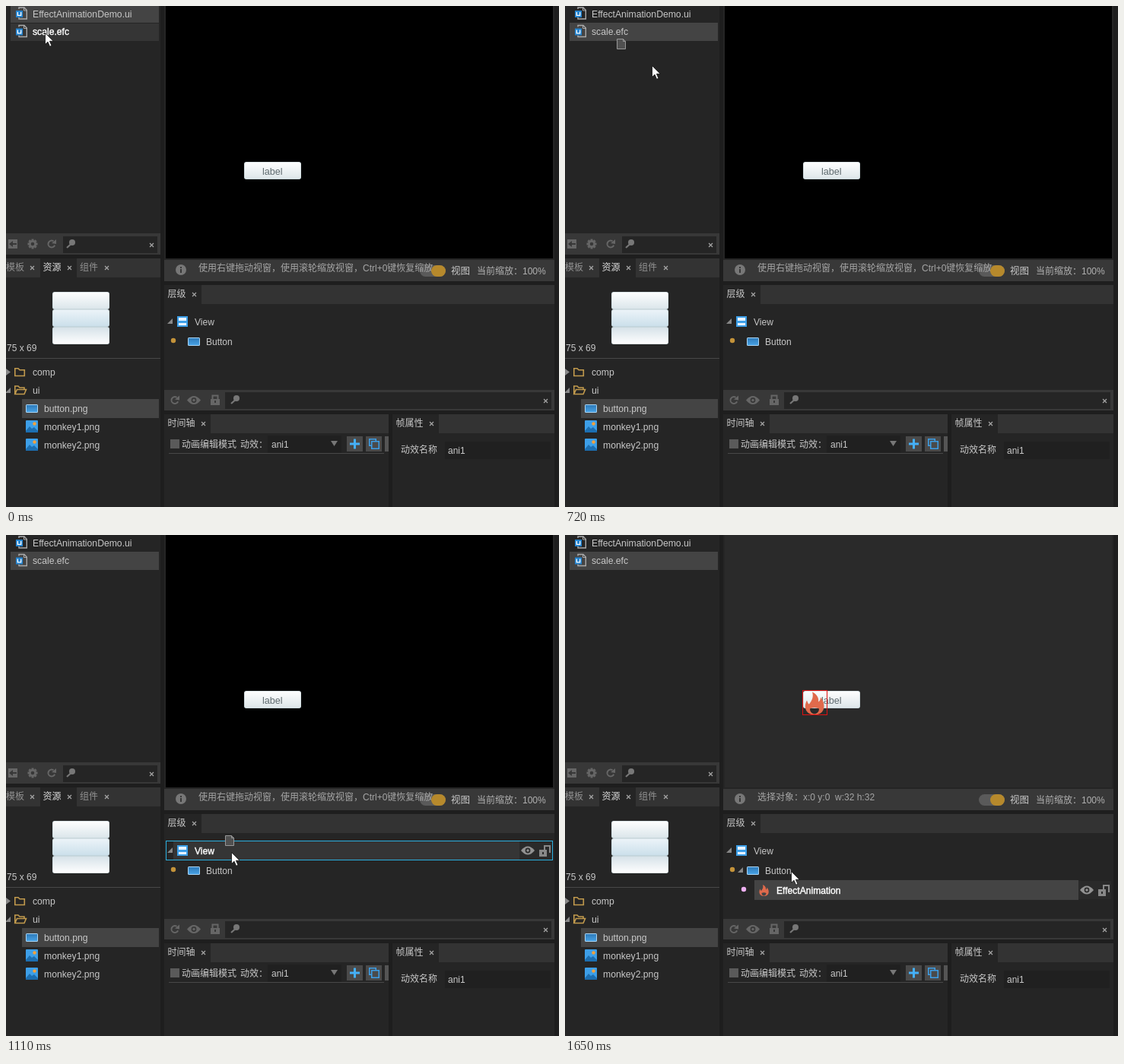
Recreate the animation shown at these times as an HTML page with a canvas. Size 727 px wide and 659 px high, loop 3.3 s.

```html
<!DOCTYPE html>
<html lang="zh-CN">
<head>
<meta charset="utf-8">
<style>
html, body { margin: 0; width: 100%; height: 100%; overflow: hidden; background: #1e1e1e; }
canvas { display: block; }
</style>
</head>
<body>
<canvas id="stage" width="727" height="659"></canvas>
<script>
const ctx = document.getElementById('stage').getContext('2d');
const LOOP = 3300, STEP = 30, DRAG = 660, DROP = 1650;
const FONT = '"Liberation Sans", "Noto Sans CJK SC", "Noto Sans CJK", sans-serif';
const PANEL = '#252525', STRIP = '#333', BAR = '#383838', SELECTED = '#444', FIELD = '#202020';
const TEXT = '#c8c8c8', DIM = '#929292', ICON = '#666', BLUE = '#3d9fe8', GOLD = '#c19a4d';

// Pointer positions, one per step, starting just before the drag
const dragPath = [[51, 33], [54, 36], [75, 51], [114, 78], [160, 110], [207, 151], [243, 194],
  [257, 219], [275, 262], [287, 306], [290, 338], [290, 360], [290, 368], [291, 381], [293, 391],
  [295, 403], [296, 417], [297, 434], [297, 438], [297, 440], [297, 441], [297, 442]];
const flame = new Path2D('M13 2C20 5 22 11 21 15C23 14 24 12 24 9C31 17 31 32 16 32C5 32 1 22 6 13' +
  'C7 16 8 18 9 18C13 13 15 8 13 2ZM10 24C10 33 22 33 22 24C18 22 14 22 10 24Z');
const arrow = new Path2D('M.5 .5V15.5L4 12.2L6.6 18.2L9 17.2L6.4 11.3H11.2Z');
const page = new Path2D('M.5 .5H8.5L11.5 3.5V13.5H.5Z');
const eyeShape = new Path2D('M-9 0Q0 -11 9 0Q0 11 -9 0Z');

function rect(x, y, w, h, color) {
  ctx.fillStyle = color;
  ctx.fillRect(x, y, w, h);
}
function frame(x, y, w, h, color, width = 1) {
  ctx.strokeStyle = color;
  ctx.lineWidth = width;
  ctx.strokeRect(x + width / 2, y + width / 2, w - width, h - width);
}
function round(x, y, w, h, r, color) {
  ctx.fillStyle = color;
  ctx.beginPath();
  ctx.roundRect(x, y, w, h, r);
  ctx.fill();
}
function disc(x, y, r, color) {
  ctx.fillStyle = color;
  ctx.beginPath();
  ctx.arc(x, y, r, 0, 7);
  ctx.fill();
}
function poly(color, ...points) {
  ctx.fillStyle = color;
  ctx.beginPath();
  for (const [x, y] of points) ctx.lineTo(x, y);
  ctx.fill();
}
function line(color, width, ...points) {
  ctx.strokeStyle = color;
  ctx.lineWidth = width;
  ctx.beginPath();
  for (const [x, y] of points) ctx.lineTo(x, y);
  ctx.stroke();
}
function text(s, x, y, color = TEXT, size = 12) {
  ctx.font = `${size}px ${FONT}`;
  ctx.fillStyle = color;
  ctx.fillText(s, x, y);
}
function strongText(s, x, y, size = 12) {
  text(s, x, y, '#fff', size);
  ctx.strokeStyle = '#fff';
  ctx.lineWidth = 0.4;
  ctx.strokeText(s, x, y);
}
function label(s, x, y, strong, size) {
  if (strong) strongText(s, x, y, size);
  else text(s, x, y, TEXT, size);
}
function at(x, y, draw, scale = 1) {
  ctx.save();
  ctx.translate(x, y);
  ctx.scale(scale, scale);
  draw();
  ctx.restore();
}
function gradient(y, h, top, bottom) {
  const g = ctx.createLinearGradient(0, y, 0, y + h);
  g.addColorStop(0, top);
  g.addColorStop(1, bottom);
  return g;
}
function cross(x, y, color = '#aaa') {
  line(color, 1.1, [x - 2.5, y - 2.5], [x + 2.5, y + 2.5]);
  line(color, 1.1, [x + 2.5, y - 2.5], [x - 2.5, y + 2.5]);
}
function tab(s, x, closeX, y, color = TEXT) {
  text(s, x, y + 16, color);
  cross(closeX, y + 12.5);
}

function pushButton(x, y, top = '#fff', bottom = '#dce5e8') {
  round(x, y, 75, 23, 3, '#b9cbd0');
  round(x + 0.5, y + 0.5, 74, 22, 2.5, gradient(y, 23, top, bottom));
}
function fileIcon(y) {
  line('#aaa', 1.4, [17, y + 3], [17, y + 1], [24, y + 1], [27.3, y + 4.5], [27.3, y + 16],
    [17, y + 16], [17, y + 14]);
  line('#aaa', 1, [23.5, y + 1], [23.5, y + 5], [27, y + 5]);
  rect(13, y + 5, 9, 9, '#2383cf');
  line('#fff', 1.3, [15.3, y + 7], [15.3, y + 11.3], [19.7, y + 11.3], [19.7, y + 7]);
}
function buttonIcon(x, y) {
  round(x, y, 16, 11, 1.5, '#a9d5f5');
  rect(x + 1, y + 1, 14, 9, gradient(y, 11, '#2b77b6', '#4aa5e8'));
}
function imageIcon(y) {
  round(26, y, 16, 16, 1, BLUE);
  poly('#1c6eb0', [26, y + 14], [31, y + 8], [34, y + 11], [37, y + 9], [42, y + 14], [42, y + 16], [26, y + 16]);
  disc(37.5, y + 4.5, 2.2, '#f2a13c');
}
function refreshIcon(x, y) {
  ctx.strokeStyle = ICON;
  ctx.lineWidth = 2;
  ctx.beginPath();
  ctx.arc(x, y, 4.5, 0.4, 5.3);
  ctx.stroke();
  poly(ICON, [x + 6, y - 6], [x + 6, y], [x, y - 1]);
}
function searchIcon(x, y) {
  ctx.strokeStyle = '#777';
  ctx.lineWidth = 2;
  disc(x + 2, y - 1.5, 4, '#777');
  line('#777', 2.2, [x, y + 1], [x - 5, y + 5.5]);
}
function gearIcon(x, y) {
  for (let i = 0; i < 4; i++) {
    const dx = 6.5 * Math.cos(i * Math.PI / 4), dy = 6.5 * Math.sin(i * Math.PI / 4);
    line(ICON, 3, [x - dx, y - dy], [x + dx, y + dy]);
  }
  disc(x, y, 5, ICON);
  disc(x, y, 2.3, BAR);
}
function eyeIcon(x, y, color, back) {
  at(x, y, () => {
    ctx.fillStyle = color;
    ctx.fill(eyeShape);
    disc(0, 0, 3.4, back);
    disc(0, 0, 1.7, color);
  });
}
function openLockIcon(x, y) {
  rect(x - 8, y - 1, 10, 9, '#888');
  rect(x - 4, y + 2, 2, 3, '#2a2a2a');
  line('#888', 2, [x - 1, y - 1], [x - 1, y - 6], [x + 6, y - 6], [x + 6, y + 3]);
}
function rowTools(y) {
  rect(675, y + 1, 43, 24, '#2a2a2a');
  eyeIcon(686, y + 13, '#929292', '#2a2a2a');
  openLockIcon(709, y + 13);
}
function foldMark(x, y) {
  poly('#888', [x, y + 7], [x + 7, y + 7], [x + 7, y]);
}
function drawFlame(x, y, scale) {
  at(x, y, () => {
    ctx.fillStyle = '#e06a4c';
    ctx.fill(flame, 'evenodd');
  }, scale);
}

function fileList(t) {
  rect(0, 0, 203, 299, PANEL);
  const picked = t >= 540;
  rect(6, picked ? 22 : 0, 195, picked ? 24 : 22, SELECTED);
  if (!picked) rect(6, 23, 195, 23, '#353535');
  fileIcon(1);
  fileIcon(24.5);
  text('EffectAnimationDemo.ui', 35, 15, TEXT, 12.2);
  label('scale.efc', 35, 38, t < DRAG, 12.2);
  rect(0, 299, 203, 28, BAR);
  rect(75, 303, 124, 22, PANEL);
  rect(3, 307, 12, 12, ICON);
  line(BAR, 2, [14, 313], [7, 313]);
  poly(BAR, [4, 313], [9, 309], [9, 317]);
  gearIcon(35, 313);
  refreshIcon(60, 313);
  searchIcon(85, 312.5);
  cross(191.5, 314.5);
}
function assets() {
  rect(0, 332, 203, 327, PANEL);
  rect(0, 332, 203, 25, STRIP);
  rect(45, 332, 48, 25, PANEL);
  tab('模板', 0, 34.5, 332, DIM);
  tab('资源', 48.5, 83.5, 332, '#ddd');
  tab('组件', 97, 132.5, 332, DIM);
  pushButton(61, 376, '#fff', '#dae5ea');
  pushButton(61, 399, '#edf4f9', '#cadfea');
  pushButton(61, 422, '#d5e1e8', '#fff');
  text('75 x 69', 1, 454);
  rect(0, 463, 203, 1, '#484848');
  poly('#888', [0, 477], [6, 481.5], [0, 486]);
  foldMark(-1, 502);
  line(GOLD, 1.6, [11.8, 486.5], [11.8, 476.8], [16, 476.8], [18, 478.8], [24.3, 478.8], [24.3, 486.5], [11, 486.5]);
  line(GOLD, 1.6, [11.8, 510.5], [11.8, 500], [16, 500], [18, 502], [24, 502], [24, 504.5],
    [14.5, 504.5], [11.8, 510.5], [24, 510.5], [26.5, 504.5], [23, 504.5]);
  text('comp', 35, 486, TEXT, 12.2);
  text('ui', 35, 510, TEXT, 12.2);
  rect(21, 517, 180, 25, SELECTED);
  buttonIcon(26, 524);
  imageIcon(545);
  imageIcon(569);
  text('button.png', 50, 534, TEXT, 12.2);
  text('monkey1.png', 50, 558, TEXT, 12.2);
  text('monkey2.png', 50, 582, TEXT, 12.2);
}
function viewport(dropped) {
  rect(208, 0, 513, 334, PANEL);
  rect(210, 0, 509, 332, dropped ? '#2a2a2a' : '#000');
  pushButton(313, 205);
  text('label', 337, 222, '#5e6a6e', 12.6);
  if (dropped) {
    drawFlame(312, 204.5, 1);
    frame(312, 204, 33, 33, '#e01010');
  }
  rect(208, 334, 513, 28, BAR);
  disc(230, 347, 7, '#777');
  rect(229, 346, 2, 5, BAR);
  rect(229, 343, 2, 2, BAR);
  round(544, 341, 34, 15, 7.5, '#5a5a5a');
  text(dropped ? '选择对象：x:0 y:0  w:32 h:32' : '使用右键拖动视窗，使用滚轮缩放视窗，Ctrl+0键恢复缩放',
    253, 349, '#a5a5a5');
  round(559, 341, 19, 15, 7.5, '#b6892c');
  text('视图', 585, 353, TEXT, 12.5);
  text('当前缩放：100%', 619, 353, '#b0b0b0');
}
function hoverRow(x, y) {
  rect(x, y, 719 - x, 26, PANEL);
  rect(x + 10, y, 709 - x, 26, '#353535');
  rowTools(y);
  frame(x, y, 719 - x, 26, '#2bb0e0');
}
function hierarchy(dropped, hover) {
  rect(208, 367, 513, 138, PANEL);
  rect(208, 367, 513, 25, STRIP);
  rect(208, 367, 49, 25, PANEL);
  tab('层级', 212.5, 247.5, 367);
  if (hover === 'view') hoverRow(210, 402);
  if (hover === 'button') hoverRow(225, 428);
  foldMark(212, 411);
  rect(225, 408, 14, 14, BLUE);
  rect(227, 410, 10, 4, '#e8f4ff');
  rect(227, 417, 10, 3, '#e8f4ff');
  label('View', 248, 420, hover === 'view');
  disc(220, 440, 3.2, '#c4933a');
  buttonIcon(239, 436);
  label('Button', 263, 446, hover === 'button');
  if (dropped) {
    foldMark(227, 437);
    rect(249, 454, 426, 26, SELECTED);
    rowTools(454);
    disc(235, 466, 3.2, '#eeb0f2');
    drawFlame(253.5, 459, 0.5);
    strongText('EffectAnimation', 278, 472, 12.1);
  }
  rect(208, 505, 513, 27, BAR);
  rect(288, 508, 429, 22, PANEL);
  refreshIcon(222, 518.5);
  eyeIcon(247, 518.5, ICON, BAR);
  rect(269, 517, 12, 8, ICON);
  line(ICON, 2, [271.5, 517], [271.5, 512.5], [278.5, 512.5], [278.5, 517]);
  rect(274, 519, 2, 3, BAR);
  searchIcon(301, 517.5);
  cross(709.5, 519.5);
}
function timeline() {
  rect(208, 537, 295, 122, PANEL);
  rect(208, 537, 295, 25, STRIP);
  rect(208, 537, 61, 25, PANEL);
  tab('时间轴', 212.5, 259.5, 537);
  rect(216, 570, 12, 12, '#5a5a5a');
  text('动画编辑模式', 231, 581);
  text('动效：', 308, 581);
  rect(344, 565, 97, 23, FIELD);
  text('ani1', 349, 581);
  poly('#777', [427, 572], [436, 572], [431.5, 579]);
  rect(448, 566, 21, 20, '#4a4a4a');
  rect(452, 574.5, 13, 3, '#45b0f8');
  rect(457, 569.5, 3, 13, '#45b0f8');
  rect(473, 566, 21, 20, '#4a4a4a');
  frame(477, 569, 10, 10, BLUE, 1.5);
  rect(480, 572, 11, 11, '#4a4a4a');
  frame(480, 572, 11, 11, BLUE, 1.5);
  rect(498, 566, 5, 20, '#555');
  rect(214, 588, 283, 1, '#484848');
}
function properties() {
  rect(508, 537, 213, 122, PANEL);
  rect(508, 537, 213, 25, STRIP);
  rect(508, 537, 61, 25, PANEL);
  tab('帧属性', 512.5, 559.5, 537);
  text('动效名称', 519, 588);
  rect(577, 573, 139, 23, FIELD);
  text('ani1', 581, 589);
}
function pointer([x, y]) {
  at(x, y, () => {
    ctx.fillStyle = '#fff';
    ctx.fill(arrow);
    ctx.strokeStyle = '#111';
    ctx.lineWidth = 0.8;
    ctx.stroke(arrow);
  });
}
function draggedPage([x, y]) {
  at(x - 7, y - 8, () => {
    ctx.fillStyle = '#505050';
    ctx.fill(page);
    ctx.strokeStyle = '#999';
    ctx.lineWidth = 1;
    ctx.stroke(page);
    line('#999', 1, [8.5, 0.5], [8.5, 3.5], [11.5, 3.5]);
  });
}

function draw(t) {
  const dropped = t >= DROP, dragging = t >= DRAG && !dropped;
  const step = Math.floor((t - DRAG) / STEP) + 1;
  const pathPoint = i => dragPath[Math.min(Math.max(i, 0), dragPath.length - 1)];
  const tip = t < DRAG ? [51, t < 90 ? 35 : t < 120 ? 34 : 33] : pathPoint(step);
  // The carried page and row highlight trail the pointer by one step
  const held = step >= dragPath.length - 1 ? tip : pathPoint(step - 1);
  const hover = !dragging || held[1] < 402 ? '' : held[1] < 428 ? 'view' : 'button';
  rect(0, 0, 727, 659, '#1e1e1e');
  fileList(t);
  assets();
  viewport(dropped);
  hierarchy(dropped, hover);
  timeline();
  properties();
  if (dragging) draggedPage(held);
  pointer(tip);
}

const start = performance.now();
function tick() {
  draw((performance.now() - start) % LOOP);
  requestAnimationFrame(tick);
}
tick();
</script>
</body>
</html>
```
